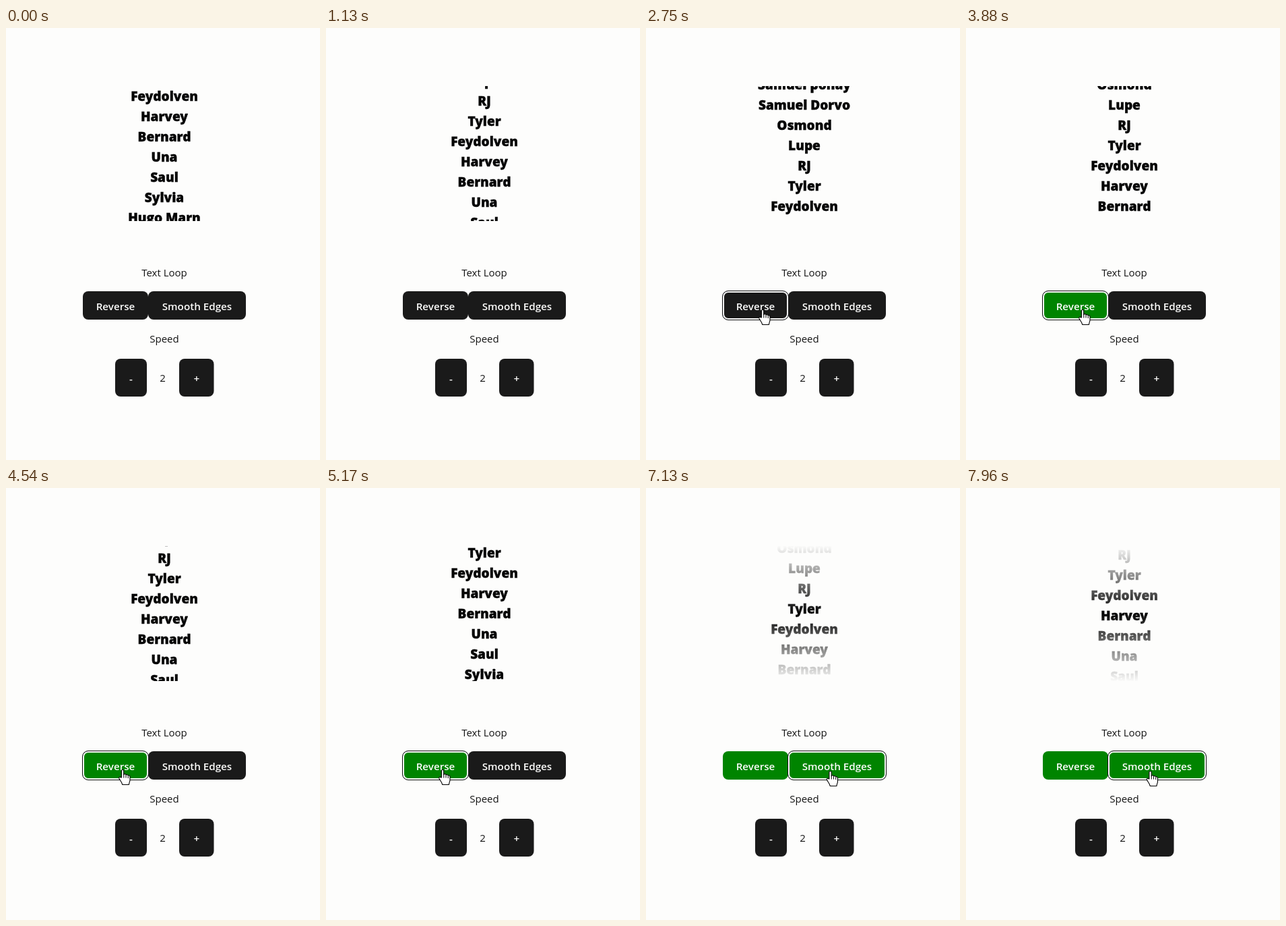
These frames come from a looping animation (466 by 640 pixels, 8000 ms). An HTML page:

```html
<!DOCTYPE html>
<html lang="en">
<head>
<meta charset="utf-8">
<title>Text Loop</title>
<style>
  html, body { margin: 0; width: 100%; height: 100%; overflow: hidden; background: #fdfdfc; }
  svg { display: block; width: 100%; height: 100%; }
  text { font: 15px "Open Sans", "Noto Sans", sans-serif; text-anchor: middle; fill: #141414; }
  #list text { font-size: 19px; font-weight: 800; fill: #040404; stroke: #040404; stroke-width: .4px; }
  .label { font-size: 15.2px; font-weight: 600; fill: #fdfdfc; }
</style>
</head>
<body>
<svg id="stage" viewBox="0 0 466 640">
  <defs>
    <clipPath id="window"><rect x="100" y="86" width="270" height="200"/></clipPath>
    <linearGradient id="edges" x1="0" y1="0" x2="0" y2="1">
      <stop offset="0" stop-color="#fdfdfc"/>
      <stop offset=".5" stop-color="#fdfdfc" stop-opacity="0"/>
      <stop offset="1" stop-color="#fdfdfc"/>
    </linearGradient>
  </defs>
  <g id="list" clip-path="url(#window)"></g>
  <rect id="fade" x="100" y="85" width="270" height="202" fill="url(#edges)"/>
  <text x="235" y="368">Text Loop</text>
  <g id="buttons"></g>
  <text x="235" y="466">Speed</text>
  <text x="232.5" y="524">2</text>
  <g id="cursor" stroke="#000" stroke-linejoin="round" fill="#fff">
    <path id="arrow" d="M0 0V16.5L3.8 13L6.4 19L9 17.9L6.4 12H11.8Z"/>
    <g id="hand">
      <path stroke-width="1.1" d="M-1.6 11.5V1.6C-1.6 -.6 1.7 -.6 1.7 1.6V7.2C2.3 5.8 4.8 6 5 7.8C5.7 6.6 8 7 8.2 8.7C9 7.8 11 8.3 11 10.2V15.2C11 17.6 9.7 18.6 9.4 22H-.3C-.6 19.2 -3.2 16.2 -5 13.1C-6 11 -3.7 9.8 -2.3 11.4Z"/>
      <path stroke-width="1" fill="none" d="M1.8 7V12M5 8V12M8.2 9V12.5"/>
    </g>
  </g>
</svg>
<script>
const LOOP = 8000, ROW = 30, ANCHOR = 5;
const DARK = "#1a1a1a", GREEN = "#008400", PAPER = "#fdfdfc";
const REVERSE = { press: 2720, click: 2820 };
const SMOOTH = { press: 6640, click: 6800 };
const names = ["Samuel Dorvo", "Osmond", "Lupe", "RJ", "Tyler", "Feydolven", "Harvey",
  "Bernard", "Una", "Saul", "Sylvia", "Hugo Marn", "Ed", "Samuel ponay"];

// time, x, y of the pointer tip
const path = [
  [1300, 480, 372], [1670, 250, 396], [1980, 120, 426],
  [2400, 164, 424], [2640, 173, 417.5], [5350, 173, 417.5],
  [5700, 222, 424], [6050, 273.5, 419.5]
];

const $ = id => document.getElementById(id);
function add(parent, tag, attrs, text = "") {
  const el = document.createElementNS("http://www.w3.org/2000/svg", tag);
  for (const key in attrs) el.setAttribute(key, attrs[key]);
  el.textContent = text;
  return parent.appendChild(el);
}
const show = (el, on) => el.setAttribute("visibility", on ? "visible" : "hidden");
const mod = (a, n) => ((a % n) + n) % n;

const rows = names.map(name => add($("list"), "text", { x: 235 }, name));

function button(x, y, w, h, label, baseline) {
  const g = add($("buttons"), "g", {});
  const frame = (parent, inset, attrs) => add(parent, "rect", {
    x: x + inset, y: y + inset, width: w - 2 * inset, height: h - 2 * inset, rx: 8 - inset, fill: "none", ...attrs
  });
  const face = frame(g, 0, { fill: DARK });
  const border = frame(g, .5, { stroke: "#5058b0" });
  const ring = add(g, "g", { visibility: "hidden" });
  frame(ring, 1, { stroke: PAPER, "stroke-width": 2 });
  frame(ring, -.5, { stroke: "#101010", "stroke-width": 1 });
  add(g, "text", { class: "label", x: x + w / 2, y: baseline }, label);
  const over = p => p.x >= x && p.x < x + w && p.y >= y && p.y < y + h;
  return { face, border, ring, over };
}

const buttons = [
  button(114, 390, 97, 42, "Reverse", 418),
  button(211, 390, 145, 42, "Smooth Edges", 418),
  button(162, 490, 47, 56, "-", 525),
  button(257, 490, 51.5, 56, "+", 525)
];
const [reverse, smooth] = buttons;

function listY(t) {
  if (t < REVERSE.click) return 102 + .0592 * t;
  if (t < SMOOTH.click) return 269 - .0602 * (t - REVERSE.click);
  return 160 + .0602 * (7960 - t);
}

function pointer(t) {
  const next = path.findIndex(p => p[0] > t);
  if (next < 0) return { x: path.at(-1)[1], y: path.at(-1)[2] };
  if (next === 0) return { x: -60, y: -60 };
  const [t0, x0, y0] = path[next - 1], [t1, x1, y1] = path[next];
  const u = (t - t0) / (t1 - t0), e = u * u * (3 - 2 * u);
  return { x: x0 + (x1 - x0) * e, y: y0 + (y1 - y0) * e };
}

function draw(t) {
  const top = listY(t), size = ROW * names.length;
  rows.forEach((row, i) => {
    const y = 60 + mod(top + ROW * (i - ANCHOR) - 60, size);
    row.setAttribute("y", Math.round(y + 6));
  });
  show($("fade"), t >= SMOOTH.click);

  const p = pointer(t);
  for (const b of buttons) show(b.border, b.over(p));
  show(reverse.ring, t >= REVERSE.press && t < SMOOTH.press);
  show(smooth.ring, t >= SMOOTH.press);
  reverse.face.setAttribute("fill", t >= REVERSE.click ? GREEN : DARK);
  smooth.face.setAttribute("fill", t >= SMOOTH.click ? GREEN : DARK);

  const hovering = buttons.some(b => b.over(p));
  show($("hand"), hovering);
  show($("arrow"), !hovering);
  $("cursor").setAttribute("transform", `translate(${p.x} ${p.y})`);
}

const start = performance.now();
function tick() {
  draw((performance.now() - start) % LOOP);
  requestAnimationFrame(tick);
}
tick();
</script>
</body>
</html>
```
